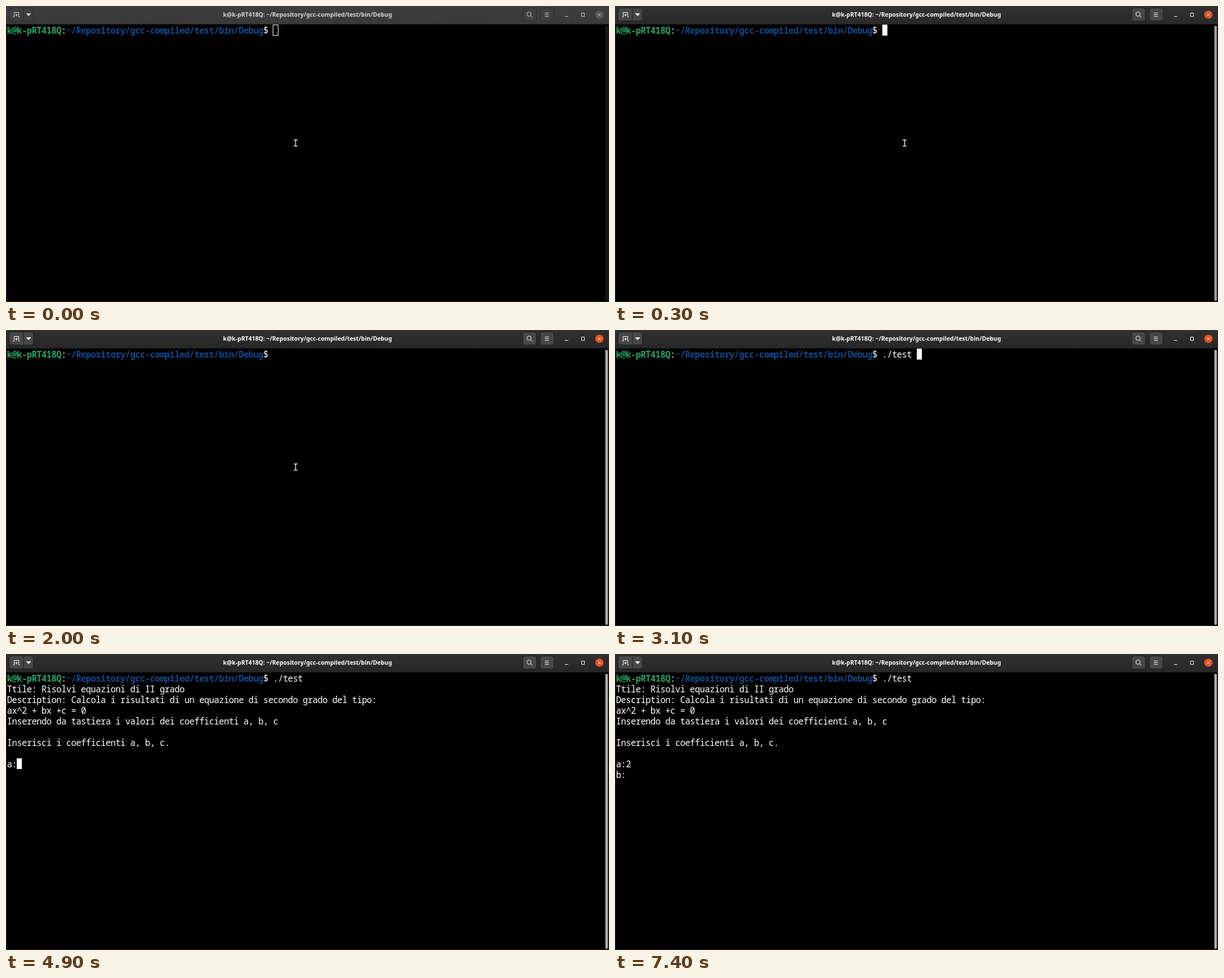
An HTML page that plays this animation: 1067x525 px, repeating every 8000 ms.

```html
<!DOCTYPE html>
<html lang="it">
<head>
<meta charset="utf-8">
<title>Terminal</title>
<style>
  html, body { margin: 0; width: 100%; height: 100%; overflow: hidden; background: #000; }
  svg { display: block; }
  text { white-space: pre; }
  .title { font: bold 10.4px "Noto Sans", sans-serif; fill: var(--title); text-anchor: middle; }
  .term { font: 15.5px "Noto Sans Mono", monospace; letter-spacing: -.58px; fill: #fff; }
  .host { font-weight: bold; fill: #26a269; }
  .path { font-weight: bold; fill: #12488b; }
  .button { fill: var(--button); stroke: var(--edge); }
  .icon { fill: none; stroke: var(--icon); }
  .solid { fill: var(--icon); }
</style>
</head>
<body>
<svg width="1067" height="525" viewBox="0 0 1067 525">
  <defs>
    <linearGradient id="bar" x2="0" y2="1">
      <stop style="stop-color:var(--top)"/>
      <stop offset="1" style="stop-color:var(--bottom)"/>
    </linearGradient>
  </defs>
  <rect width="1067" height="525"/>
  <path d="M.5 32V524.5H1066.5V32" fill="none" stroke="#2b2b2b"/>
  <rect width="1067" height="32" fill="url(#bar)"/>
  <rect y="32" width="1067" height="1" fill="#171717"/>

  <rect class="button" x="5.5" y="3.5" width="43" height="23" rx="4"/>
  <path d="M31 4V26" style="stroke:var(--edge)"/>
  <path class="icon" d="M12.5 19.5H14.5V11.5H22.5V19.5H24.5M18.5 13.5V18.5M16 16H21"/>
  <path class="solid" d="M35.5 13H44.5L40 18Z"/>
  <text class="title" x="533.5" y="19"></text>

  <rect class="button" x="914.5" y="3.5" width="24" height="23" rx="4"/>
  <circle class="icon" cx="925.5" cy="14.5" r="3.8"/>
  <path class="icon" d="M928.3 17.3L931.5 20.5"/>
  <rect class="button" x="945.5" y="3.5" width="24" height="23" rx="4"/>
  <path class="icon" d="M953.5 12.5H960.5M953.5 15.5H960.5M953.5 18.5H960.5"/>
  <path class="icon" d="M989 18.5H995M1018.5 12.5H1023.5V18.5H1018.5Z"/>
  <circle cx="1050" cy="15.5" r="7.3" style="fill:var(--close)"/>
  <path class="icon" d="M1047.4 12.9L1052.6 18.1M1052.6 12.9L1047.4 18.1"/>

  <rect x="1060.5" y="35" width="4.5" height="488" rx="2.2" style="fill:var(--thumb)"/>

  <g class="term" id="lines"></g>
  <rect id="cursor"/>
  <g id="pointer" fill="none" stroke-linecap="square">
    <path id="beam" d="M510 237.5H511.5L512.5 238.5L513.5 237.5H515M512.5 239V247M510 248.5H511.5L512.5 247.5L513.5 248.5H515" stroke="#fff" stroke-width="1.3"/>
  </g>
</svg>
<script>
const LOOP = 8000, CELL = 8.72, ROW = 19, LEFT = 1.8, TOP = 33.5;
const host = 'k@k-pRT418Q', path = '~/Repository/gcc-compiled/test/bin/Debug';
const promptLength = host.length + path.length + 3;
const output = [
  'Ttile: Risolvi equazioni di II grado',
  'Description: Calcola i risultati di un equazione di secondo grado del tipo:',
  'ax^2 + bx +c = 0',
  'Inserendo da tastiera i valori dei coefficienti a, b, c',
  '',
  'Inserisci i coefficienti a, b, c.',
  ''
];

// [unfocused, focused] grey levels or RGB triples
const theme = {
  top: [[62, 62, 62], [48, 48, 48]],
  bottom: [[57, 57, 57], [39, 39, 39]],
  button: [[62, 62, 62], [71, 71, 71]],
  edge: [[42, 42, 42], [31, 31, 31]],
  icon: [[210, 210, 210], [255, 255, 255]],
  title: [[214, 214, 214], [255, 255, 255]],
  close: [[88, 88, 88], [233, 84, 32]],
  thumb: [[23, 26, 26], [174, 174, 174]]
};
const focusSteps = [[0, 0], [200, .5], [300, .9], [400, .98], [500, 1]];

// [time, column, row]; a missing column hides the cursor
const cursorSteps = [
  [0, promptLength, 0], [800], [1400, promptLength, 0], [2000],
  [2800, promptLength, 0], [3100, promptLength + 7, 0],
  [3900, 2, 8], [4400], [4900, 2, 8], [5600], [6200, 2, 8],
  [6400, 3, 8], [7000, 2, 9], [7400]
];

const svg = document.querySelector('svg');
const lines = document.getElementById('lines');
const cursor = document.getElementById('cursor');
const pointer = document.getElementById('pointer');
document.querySelector('.title').textContent = `${host}: ${path}`;

const at = (steps, t) => steps.findLast(step => step[0] <= t);
const set = (node, attributes) => {
  for (const name in attributes) node.setAttribute(name, attributes[name]);
};

function drawFocus(t) {
  const p = at(focusSteps, t)[1];
  for (const name in theme) {
    const [from, to] = theme[name];
    const rgb = from.map((v, i) => Math.round(v + (to[i] - v) * p));
    svg.style.setProperty('--' + name, `rgb(${rgb})`);
  }
}

let shown = '';
function drawLines(t) {
  const command = t >= 3100 ? './test ' : '';
  const rows = [`<tspan class="host">${host}</tspan>:<tspan class="path">${path}</tspan>$ ${command}`];
  if (t >= 3900) rows.push(...output, t >= 6400 ? 'a:2' : 'a:');
  if (t >= 7000) rows.push('b:');
  const markup = rows.map((row, i) =>
    `<text x="${LEFT}" y="${TOP + 15.1 + i * ROW}">${row}</text>`).join('');
  if (markup !== shown) lines.innerHTML = shown = markup;
}

function drawCursor(t) {
  const [, column, row] = at(cursorSteps, t);
  const visible = column !== undefined;
  cursor.style.display = visible ? '' : 'none';
  if (!visible) return;
  const hollow = t < 200, inset = hollow ? .5 : 0;
  set(cursor, {
    x: Math.round(LEFT + column * CELL) + inset - (hollow ? 1 : 0),
    y: Math.floor(TOP + row * ROW) + inset,
    width: hollow ? 9 : 9,
    height: hollow ? 19 : row ? 19 : 19.5,
    fill: hollow ? 'none' : '#fff',
    stroke: hollow ? '#fff' : 'none'
  });
}

function frame() {
  const t = performance.now() % LOOP;
  drawFocus(t);
  drawLines(t);
  drawCursor(t);
  pointer.style.display = t < 2800 ? '' : 'none';
  requestAnimationFrame(frame);
}
frame();
</script>
</body>
</html>
```
